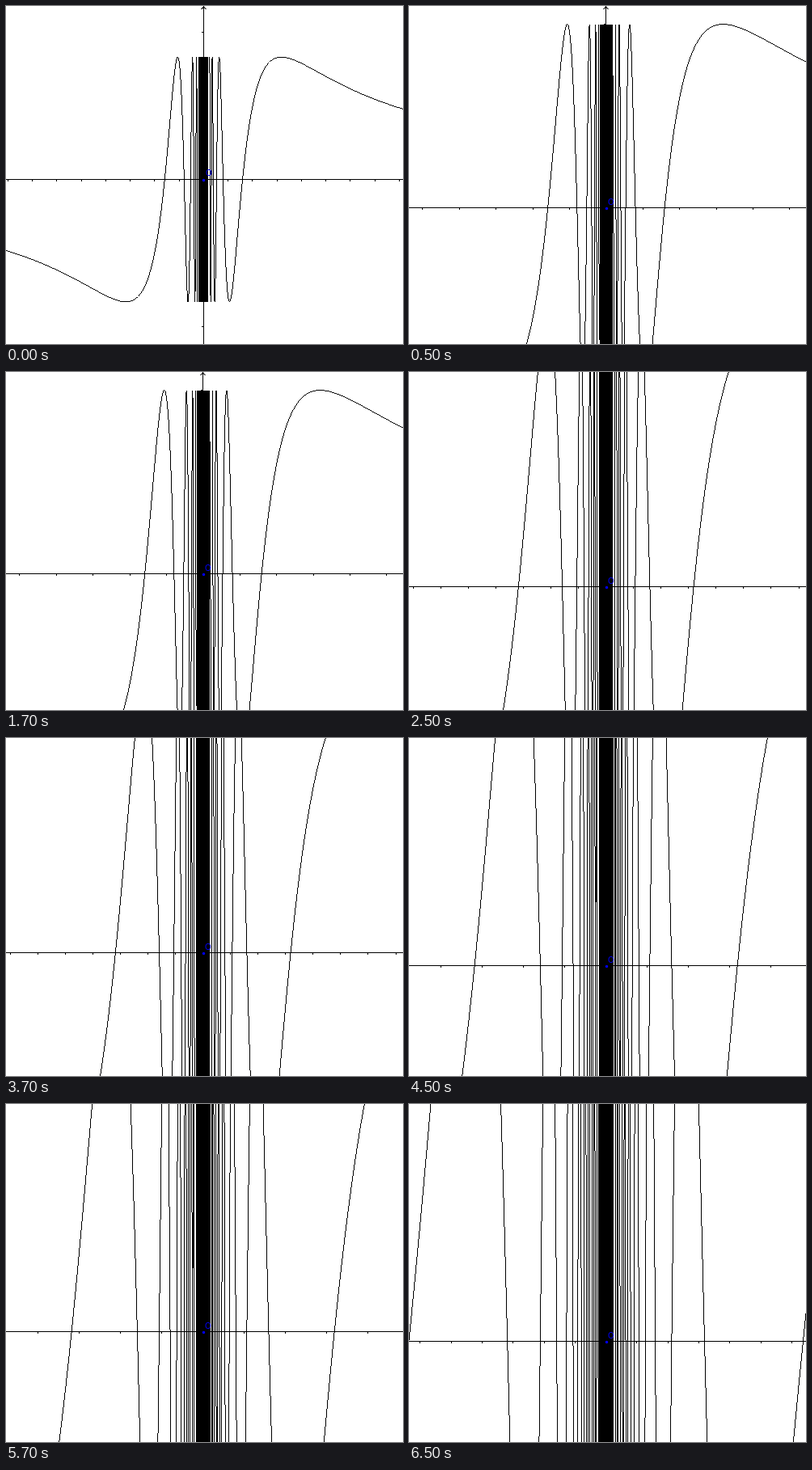
These frames come from a looping animation (491 by 418 pixels, 8000 ms). A matplotlib script:

```python
import numpy as np
import matplotlib.pyplot as plt
from matplotlib.animation import FuncAnimation
from matplotlib.collections import LineCollection
from matplotlib.patches import Rectangle

W, H, DPI = 491, 418, 64
PX = 72 / DPI  # one pixel in points
FRAMES, INTERVAL = 16, 500
BASE_SCALE, ZOOM = 151.3, 1.5
ORIGIN_ROWS = [214.5, 249.5, 265.5, 281.5, 293.5]

fig = plt.figure(figsize=(W / DPI, H / DPI), dpi=DPI, facecolor="white")
ax = fig.add_axes([0, 0, 1, 1])


def centre(value):
    """Centre of the pixel that holds the value."""
    return np.floor(value) + 0.5


def stroke(x, y):
    ax.plot(x, y, color="black", lw=PX, snap=False, solid_capstyle="butt")


def draw_axes(ox, oy, step):
    cx = centre(ox)
    stroke([0, W], [oy, oy])
    stroke([cx, cx], [0, H])
    stroke([cx - 3, cx, cx + 3], [4, 1, 4])
    count = int(W / step) + 1
    for k in range(-count, count + 1):
        tx, ty = centre(ox + k * step), centre(oy + k * step)
        if k and 0 < tx < W:
            stroke([tx, tx], [oy, oy + 2.5])
        if k and 0 < ty < H:
            stroke([cx - 2.5, cx], [ty, ty])


def steepness(u):
    """Slope of sin(1/x), written with u = 1/x."""
    return np.abs(np.cos(u)) * u * u


def draw_curve(ox, oy, scale, core):
    """Crisp one-pixel y = sin(1/x): row by row if steep, else by column."""
    rows = np.arange(H) + 0.5
    rows = rows[np.abs(oy - rows) < scale]
    angle = np.arcsin((oy - rows) / scale)
    swings = int(scale / core / np.pi) + 1
    dots = []
    for n in range(-swings, swings + 1):
        # Where swings crowd together only some of them show.
        if n % max(1, np.ceil(1.5 * np.pi * n * n / scale)):
            continue
        u = n * np.pi + (-1) ** n * angle
        keep = (steepness(u) > 1) & (np.abs(u) < scale / core)
        x = centre(ox + scale / u[keep])
        dots.append(np.column_stack([x, rows[keep]]))

    columns = np.arange(W) + 0.5
    columns = columns[np.abs(columns - ox) > core]
    u = scale / (columns - ox)
    flat = steepness(u) <= 1
    y = centre(oy - scale * np.sin(u[flat]))
    dots.append(np.column_stack([columns[flat], y]))

    dots = np.unique(np.concatenate(dots), axis=0)
    half = np.array([0, 0.5])
    ax.add_collection(LineCollection(np.stack([dots - half, dots + half], 1),
                                     colors="black", linewidths=PX,
                                     snap=False, capstyle="butt"))


def draw(frame):
    level = (frame + 3) // 4  # the view jumps closer every four frames
    scale = BASE_SCALE * ZOOM ** level
    ox, oy = 243.6 + 0.8 * 0.4 ** level, ORIGIN_ROWS[level]
    core = 9.5 - 3.5 * 0.5 ** level
    ax.clear()
    ax.set(xlim=(0, W), ylim=(H, 0))
    ax.axis("off")
    draw_axes(ox, oy, 0.2 / 2 ** (level // 2) * scale)
    draw_curve(ox, oy, scale, core + 1)
    left, right = np.round(ox - core), np.round(ox + core)
    ax.add_patch(Rectangle((left, oy - scale), right - left, 2 * scale,
                           color="black", lw=0, zorder=3))
    ax.plot(ox, oy, "o", ms=3.4 * PX, mew=0, color="blue", zorder=4)
    ax.text(ox + 5.7, oy - 4, "O", color="blue", size=10 * PX, ha="center",
            va="baseline", family="DejaVu Sans", zorder=4)
    return []


anim = FuncAnimation(fig, draw, frames=FRAMES, interval=INTERVAL,
                     init_func=lambda: [], repeat=True, repeat_delay=0)
plt.show()
```
